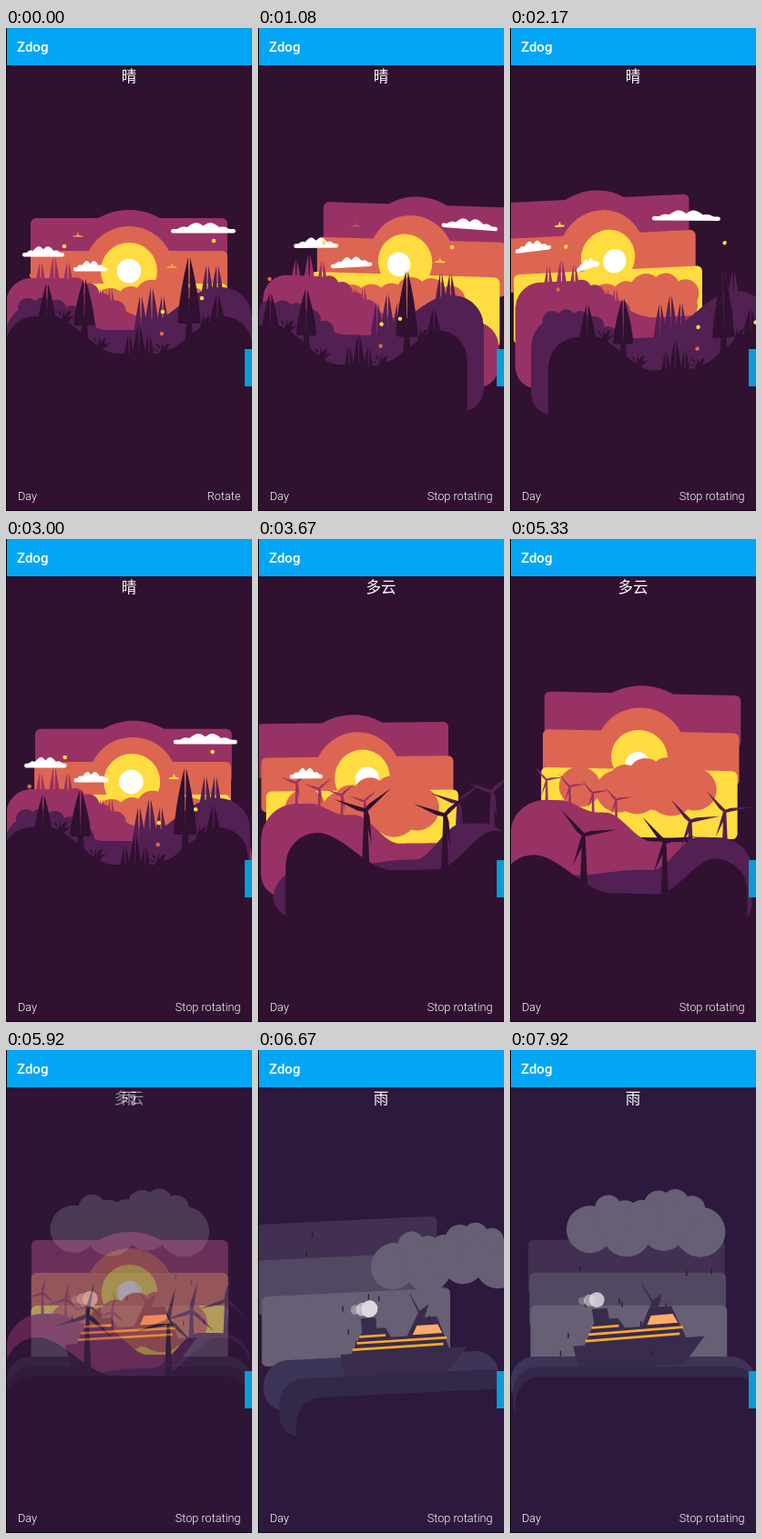
An HTML page with a canvas for the animation above (8010 ms loop, 270x531 px).

```html
<!DOCTYPE html>
<html lang="en">
<head>
<meta charset="utf-8">
<title>Zdog</title>
<style>
html, body { margin: 0; width: 100%; height: 100%; overflow: hidden; background: #301130; }
body { position: relative; font-family: Roboto, "Noto Sans", sans-serif; color: #fff; }
header { position: absolute; left: 0; top: 0; width: 270px; height: 41px; background: #03a6f4;
  font-size: 15px; font-weight: 500; line-height: 42px; text-indent: 12px; }
section, canvas { position: absolute; left: 0; top: 0; width: 270px; height: 531px; }
h2 { position: absolute; left: 0; top: 41px; width: 270px; margin: 0; text-align: center;
  font: 400 16.5px/23px "Noto Sans CJK SC", "Noto Sans CJK", "Noto Sans CJK JP", sans-serif; }
.button { position: absolute; top: 505px; font-size: 12.7px; font-weight: 300; line-height: 19px; }
#day { left: 13px; }
#turn { right: calc(100% - 257.5px); white-space: nowrap; }
#handle { position: absolute; left: 262px; top: 353px; width: 8px; height: 41px; background: #079dd6; }
#edge { position: absolute; inset: 0; border: solid #0c060c; border-width: 0 0 1px 1px; }
</style>
</head>
<body>
<section><canvas></canvas><h2>晴</h2></section>
<section><canvas></canvas><h2>多云</h2></section>
<section><canvas></canvas><h2>雨</h2></section>
<header>Zdog</header>
<div class="button" id="day">Day</div>
<div class="button" id="turn">Rotate</div>
<div id="handle"></div>
<div id="edge"></div>
<script>
const LOOP = 8010, FADE = 330, TAU = Math.PI * 2, W = 270, H = 531, CX = 135, CY = 262;
const DARK = '#301130', PURPLE = '#522053', MAGENTA = '#983264', ORANGE = '#dd6652', GOLD = '#ffdc40';
const NIGHT = '#2d193d', SHIP = '#392b4c', MIST = '#675f74';
const dpr = window.devicePixelRatio || 1;

// time in ms, number of swings completed
const swing = [[200, 0], [2170, 1.404], [3000, 1.833], [4170, 2.685], [5330, 3.513], [6670, 4.404], [7920, 5.187]];

let c, cosX, sinX, cosY, sinY;

const clamp = v => Math.max(0, Math.min(1, v));

// smooth rise from 0 at a to 1 at b
function step(x, a, b) {
  const u = clamp((x - a) / (b - a));
  return u * u * (3 - 2 * u);
}

function noise(n) {
  const s = Math.sin(n * 127.1 + 3.7) * 43758.5453;
  return s - Math.floor(s);
}

function turnScene(t) {
  const k = Math.max(1, swing.findLastIndex(s => t > s[0]) + 1);
  const [[t0, a], [t1, b]] = swing.slice(Math.min(k, swing.length - 1) - 1);
  const p = Math.max(0, a + (b - a) * (t - t0) / (t1 - t0)) % 1;
  const eased = p < 0.5 ? 4 * p ** 3 : 1 - 4 * (1 - p) ** 3;
  const angle = eased * TAU, reach = TAU * 3 / 64;
  const ry = Math.sin(angle) * reach, rx = (1 - Math.cos(angle)) / 2 * reach;
  cosX = Math.cos(rx); sinX = Math.sin(rx);
  cosY = Math.cos(ry); sinY = Math.sin(ry);
}

// flat layer at depth z in parallel projection; yaw makes z grow along x around mid
function depth(z, yaw = 0, mid = CX) {
  const a = cosY + yaw * sinY, b = yaw * cosY * sinX - sinX * sinY;
  const z0 = z + yaw * (CX - mid);
  c.setTransform(dpr * a, dpr * b, 0, dpr * cosX,
    dpr * (CX - CX * a + z0 * sinY),
    dpr * (CY - CX * b - CY * cosX + z0 * cosY * sinX));
}

function disc(x, y, r, color) {
  c.fillStyle = color;
  c.beginPath();
  c.arc(x, y, r, 0, TAU);
  c.fill();
}

function poly(color, ...pts) {
  c.fillStyle = color;
  c.beginPath();
  pts.forEach(([x, y]) => c.lineTo(x, y));
  c.fill();
}

// trapezium with top edge a..b at y and bottom edge d..e at v
function block(color, a, b, y, d, e, v) {
  poly(color, [a, y], [b, y], [e, v], [d, v]);
}

function slab(x, y, w, h, r, color) {
  c.fillStyle = color;
  c.beginPath();
  c.roundRect(x, y, w, h, r);
  c.fill();
}

function puffs(color, from, to, n, r, yAt) {
  for (let i = 0; i < n; i++) {
    const x = from + (to - from) * i / (n - 1);
    disc(x, yAt(x), r * (1 + 0.08 * Math.sin(i * 2.4)), color);
  }
}

// land below a height rule, with all four corners rounded
function hill(color, bottom, r, yAt) {
  c.fillStyle = color;
  c.beginPath();
  for (let x = 0; x <= W; x += 1.5) {
    const d = Math.max(0, r - Math.min(x, W - x));
    c.lineTo(x, yAt(x) + r - Math.sqrt(r * r - d * d));
  }
  c.arcTo(W, bottom, 0, bottom, 26);
  c.arcTo(0, bottom, 0, 0, 26);
  c.fill();
}

function tree(color, x, top, half, h, trunk = 0) {
  const base = top + h;
  c.fillStyle = color;
  c.beginPath();
  c.moveTo(x, base);
  for (const side of [-1, 1]) {
    const end = x + side * half;
    c.moveTo(x, base);
    c.lineTo(end - side * 2, base);
    c.quadraticCurveTo(end, base, end, base - 2);
    c.bezierCurveTo(x + side * half * 0.9, top + h * 0.65, x + side * half * 0.5, top + h * 0.3, x + side, top + 1);
    c.quadraticCurveTo(x, top - 1, x - side, top + 1);
  }
  c.fill();
  if (trunk) block(color, x - 3, x + 3, base - 1, x - 4.5, x + 4.5, base + trunk);
}

function grove(color, x, top, n, gap, rise) {
  for (let i = 0; i < n; i++) {
    tree(color, x + i * gap, top - rise * Math.sin(Math.PI * i / (n - 1)), 7.5, 46);
  }
}

function fern(x, y) {
  c.fillStyle = DARK;
  for (let i = 0; i < 5; i++) {
    const a = -2.9 + i * 0.66, dx = Math.cos(a) * 12, dy = Math.sin(a) * 10;
    c.beginPath();
    c.moveTo(x - 3, y + 5);
    c.quadraticCurveTo(x + dx * 0.3, y + dy * 1.1, x + dx, y + dy);
    c.quadraticCurveTo(x + dx * 0.7, y + dy * 0.4, x + 3, y + 5);
    c.fill();
  }
}

function whiteCloud(x, y, w, z, yaw) {
  depth(z, yaw, x + w / 2);
  slab(x, y - 4.6, w, 4.6, 2.3, '#fff');
  c.beginPath();
  for (let u = 0.08; u <= 0.92; u += 0.01) {
    const lump = 0.55 + 0.45 * Math.abs(Math.sin(u * Math.PI * 4));
    c.lineTo(x + u * w, y - 3 - 9 * lump * Math.sin((u - 0.08) / 0.84 * Math.PI) ** 0.7);
  }
  c.fill();
}

function bird(x, y, z, glow) {
  depth(z);
  c.globalAlpha = glow;
  slab(x - 5.5, y, 11, 2, 1, GOLD);
  poly(GOLD, [x - 2, y + 1], [x, y - 4], [x + 2, y + 1]);
  c.globalAlpha = 1;
}

function spark(x, y, z, color) {
  depth(z);
  disc(x, y, 2.3, color);
}

function sky(colors, sun) {
  colors.forEach((color, i) => {
    depth(25 * i - 145);
    slab(27, 209 + 36 * i, 216, 60 + 9 * i * (i - 1), 6, color);
    if (sun) disc(CX, 267, 67 - 18 * i, color);
  });
  if (!sun) return;
  depth(-70);
  disc(CX, 267, 13.3, '#fff');
}

function sunny(t) {
  const back = x => 275 + 45 * step(x, 60, 160);
  const mid = x => 303 + 29 * step(x, 50, 110) - 47 * step(x, 140, 232);
  const front = x => 317 + 41 * step(x, 50, 122) - 41 * step(x, 165, 240);

  sky([MAGENTA, ORANGE, GOLD], true);
  const pulse = Math.sin(t / 1736 * TAU) / 2;
  bird(79, 228, -93, 0.5 + pulse);
  bird(182, 262, -70, 0.5 - pulse);

  depth(-35);
  puffs(ORANGE, 92, 205, 6, 17, x => 304 - 10 * step(x, 110, 170) + 8 * step(x, 180, 210));
  puffs(ORANGE, 100, 200, 5, 20, () => 315);
  depth(0);
  grove(MAGENTA, 38, 256, 3, 15, 6);
  grove(MAGENTA, 105, 285, 2, 10, 0);
  puffs(MAGENTA, 76, 120, 4, 11, x => back(x) + 7);
  hill(MAGENTA, 393, 28, back);
  whiteCloud(18, 251.5, 46, -68, -0.37);
  whiteCloud(74, 267.5, 37, -30, -0.97);
  whiteCloud(181, 225.5, 71, -68, 0.34);
  spark(64, 240, -20, GOLD);
  spark(228, 234, 40, GOLD);

  depth(60);
  grove(PURPLE, 148, 294, 3, 12, 9);
  grove(PURPLE, 221, 260, 2, 11, 0);
  puffs(PURPLE, 24, 88, 5, 11, x => mid(x) + 5);
  hill(PURPLE, 413, 34, mid);
  spark(28, 272, 70, ORANGE);

  depth(125);
  tree(DARK, 45, 280, 10, 48);
  tree(DARK, 232, 292, 10, 48);
  tree(DARK, 86, 275, 11.5, 52, 20);
  tree(DARK, 201, 251, 12.5, 74, 20);
  grove(DARK, 135, 336, 3, 11, 12);
  for (const x of [64, 103, 172, 217]) fern(x, front(x) - 2);
  hill(DARK, 470, 32, front);
  spark(172, 312, 125, GOLD);
  spark(171, 336, 125, ORANGE);
  spark(215, 297, 200, GOLD);
}

function turbine(color, x, y, h, size, angle) {
  const w = size / 11;
  block(color, x - w * 0.5, x + w * 0.5, y, x - w * 1.25, x + w * 1.25, y + h);
  c.save();
  c.translate(x, y);
  c.rotate(angle);
  for (let i = 0; i < 3; i++) {
    poly(color, [0, -w * 0.6], [size * 0.22, -w * 0.95], [size, 0], [0, w * 0.6]);
    c.rotate(TAU / 3);
  }
  c.restore();
}

function cloudy(t) {
  const spin = 0.08 + (t - 4170) / 1160 * 1.82;
  sky([MAGENTA, ORANGE, GOLD], true);
  depth(-90);
  puffs(ORANGE, 120, 188, 4, 18, x => 293 - 11 * step(x, 115, 160));
  puffs(ORANGE, 70, 196, 4, 23, x => 301 + 5 * Math.sin((x - 70) / 40));
  puffs(ORANGE, 132, 170, 2, 25, () => 306);

  depth(0);
  for (let i = 0; i < 4; i++) turbine(MAGENTA, 40 + i * 25.5, 267 + i * 7, 46, 19, spin);
  hill(MAGENTA, 393, 40, x => 290 + 13 * step(x, 55, 95) + 32 * step(x, 105, 155));
  depth(80);
  turbine(PURPLE, 204, 287, 44, 33, spin);
  turbine(PURPLE, 242, 275, 50, 31, spin);
  depth(60);
  hill(PURPLE, 413, 36, x => 358 - 8 * step(x, 70, 150) - 39 * step(x, 160, 212));
  depth(125);
  turbine(DARK, 90, 292, 60, 37, spin);
  turbine(DARK, 179, 298, 62, 37, spin);
  hill(DARK, 470, 36, x => 316 + 42 * step(x, 35, 120) - 42 * step(x, 170, 235));
  whiteCloud(74 - 0.1024 * (t - 3330), 264, 37, -30, 0);
}

function rain(t, from, to) {
  for (let i = from; i < to; i++) {
    depth(noise(i + 60) * 180 - 60);
    const y = 182 + (noise(i) * 165 + t * 0.22) % 165;
    slab(45 + noise(i + 30) * 180, y, 1.4, 6, 0.7, NIGHT);
  }
}

function ship(t) {
  c.save();
  c.translate(138, 330);
  c.rotate((-2.7 + 1.8 * Math.cos((t - 6670) / 2500 * TAU)) * TAU / 360);
  c.translate(-138, -330);
  for (let i = 0; i < 3; i++) {
    const age = (t / 500 + i + 0.66) % 3;
    c.globalAlpha = 1 - age * 0.28;
    disc(100 - age * 8, 271, 9.5 - age * 2, '#dcd8df');
  }
  c.globalAlpha = 1;
  block(SHIP, 90, 107, 281, 91, 108, 296);
  block(SHIP, 93, 118, 293, 78, 134, 321);
  block(SHIP, 153, 177, 284, 134, 191, 321);
  block(SHIP, 110, 160, 304, 110, 160, 321);
  poly(SHIP, [146, 257], [147, 257], [159, 280], [157, 281]);
  poly(SHIP, [153, 284], [157, 277], [168, 270], [163, 284]);
  block(SHIP, 66, 211, 320, 71, 186, 349);
  block('#ffad66', 154, 178, 293, 149, 183, 303);
  for (let i = 0; i < 3; i++) {
    slab(88 - i * 4, 300 + i * 7, i ? 104 : 30, 2.7, 0, '#f9a92f');
  }
  for (let x = 78; x < 196; x += 9) disc(x, 327, 0.8, '#2e2142');
  c.restore();
}

function rainy(t) {
  sky(['#413052', '#524861', MIST], false);
  rain(t, 0, 9);
  depth(0);
  hill('#3d3557', 393, 28, () => 337);
  depth(75);
  ship(t);
  depth(60);
  hill('#34284a', 413, 28, () => 348);
  depth(125);
  hill(NIGHT, 470, 28, () => 359);
  rain(t, 9, 16);
  depth(243);
  puffs(MIST, 76, 197, 4, 26, x => 198 + 3 * Math.sin(x / 13));
  puffs(MIST, 96, 188, 6, 15, x => 174 + 7 * Math.sin((x - 96) / 92 * TAU));
  puffs(MIST, 105, 170, 3, 20, () => 190);
}

const scenes = [
  { draw: sunny, start: -FADE, back: DARK },
  { draw: cloudy, start: 3250, back: DARK },
  { draw: rainy, start: 5750, back: NIGHT }
];
document.querySelectorAll('section').forEach((box, i) => {
  const canvas = box.querySelector('canvas');
  canvas.width = Math.round(W * dpr);
  canvas.height = Math.round(H * dpr);
  Object.assign(scenes[i], { box, ctx: canvas.getContext('2d') });
});
const turn = document.getElementById('turn');

function show(now) {
  const t = now % LOOP;
  turnScene(t);
  turn.textContent = t < 165 ? 'Rotate' : 'Stop rotating';
  scenes.forEach((s, i) => {
    const next = scenes[i + 1];
    const seen = next && t >= next.start + FADE ? 0 : clamp((t - s.start) / FADE);
    s.box.style.opacity = seen;
    if (!seen) return;
    c = s.ctx;
    c.setTransform(dpr, 0, 0, dpr, 0, 0);
    c.fillStyle = s.back;
    c.fillRect(0, 0, W, H);
    s.draw(t);
  });
}

function tick() {
  show(performance.now());
  requestAnimationFrame(tick);
}
tick();
</script>
</body>
</html>
```
